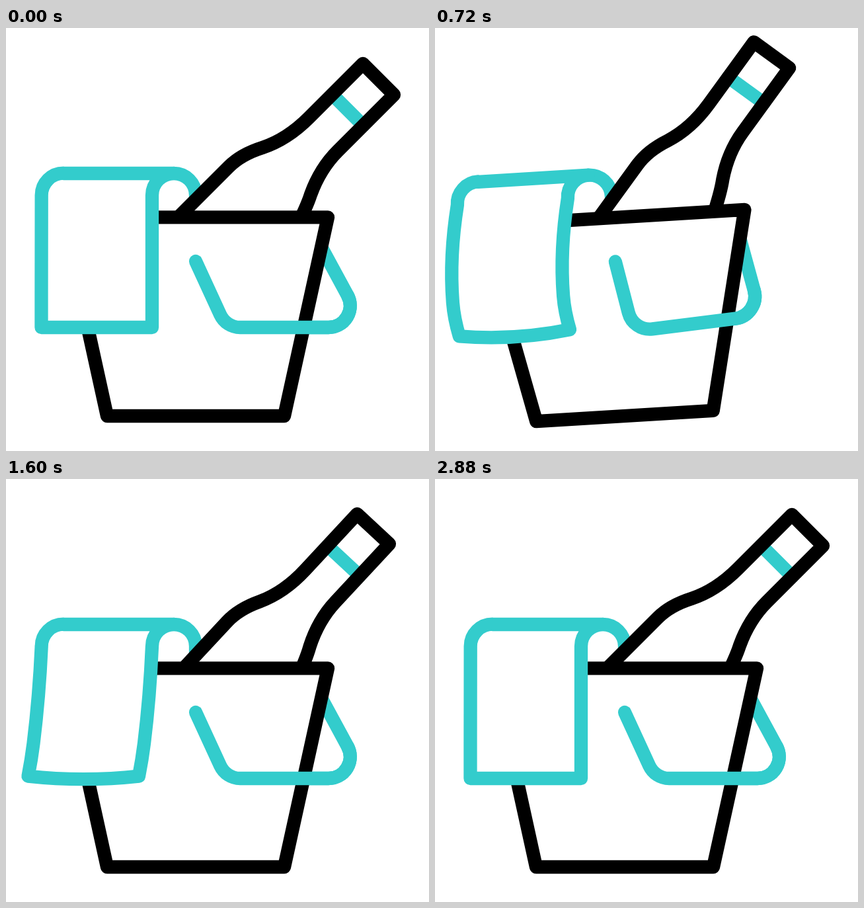
These frames come from a looping animation (640 by 640 pixels, 3120 ms). An HTML page with a canvas:

```html
<!DOCTYPE html>
<html lang="en">
<head>
<meta charset="utf-8">
<title>Ice bucket</title>
<style>
  html, body { margin: 0; width: 100%; height: 100%; overflow: hidden; background: #fff; }
  canvas { display: block; width: 640px; height: 640px; }
</style>
</head>
<body>
<canvas id="stage" width="640" height="640"></canvas>
<script>
const ctx = document.getElementById('stage').getContext('2d');
const TEAL = '#33cccc', BLACK = '#000', WHITE = '#fff';
const STEP = 40, LAST = 72, LOOP = 3120, BEAT = 8;

// A track is a list of [step, value]; swings turn round once per beat.
const swing = (first, ...values) => [[0, 0], ...values.map((v, i) => [first + BEAT * i, v])];
const tilt = swing(7, 4, -6, 2, -3, 0);
const hem = swing(8, -38, -4, -35.5, -13, -20, 0);
const belly = swing(8, -17.5, -14, -25, -17, -12, 0);
const grip = swing(8, 1, -1.1, 0.85, -0.65, 0);
const lean = [[0, 0], [7, 2.8], [17, -6.1], [23, 1.9], [31, -4.2], [38, -2], [46, -2.5], [56, 0]];
const drop = [[0, 0], [8, 16], [25, -8], [34, 15], [47, -3], [58, 2.5], [72, 0]];

// The two bends of the handle: at rest, swung out, swung in
const REST = [333, 453, 543, 453];
const OUT = [374, 422, 577, 415];
const IN = [300, 465, 494, 452.5];

const mix = (a, b, p) => a + (b - a) * p;

function at(track, f, blend = mix) {
  const i = track.findIndex(k => k[0] > f);
  if (i < 0) return blend(track.at(-1)[1], track.at(-1)[1], 0);
  const [a, va] = track[i - 1], [b, vb] = track[i];
  const p = (f - a) / (b - a);
  return blend(va, vb, p * p * (3 - 2 * p));
}

function bends(amount) {
  const to = amount > 0 ? OUT : IN;
  return REST.map((v, i) => mix(v, to[i], Math.abs(amount)));
}

function blendBends(a, b, p) {
  const end = bends(b);
  return bends(a).map((v, i) => mix(v, end[i], p));
}

function turn(x, y, deg) {
  ctx.translate(x, y);
  ctx.rotate(deg * Math.PI / 180);
  ctx.translate(-x, -y);
}

function line(...p) {
  ctx.beginPath();
  for (let i = 0; i < p.length; i += 2) ctx.lineTo(p[i], p[i + 1]);
}

function ink(color, filled) {
  if (filled) {
    ctx.fillStyle = WHITE;
    ctx.fill();
  }
  ctx.strokeStyle = color;
  ctx.stroke();
}

function bottlePath() {
  line(240, 307, 337, 210);
  ctx.bezierCurveTo(352, 195, 369, 187, 388, 181);
  ctx.bezierCurveTo(415, 172, 437, 157, 458, 136);
  ctx.lineTo(540, 54);
  ctx.lineTo(587, 101);
  ctx.lineTo(502, 186);
  ctx.bezierCurveTo(483, 205, 470, 227, 461, 252);
  ctx.quadraticCurveTo(455, 271, 436, 308);
}

function drawBottle(f) {
  ctx.save();
  ctx.translate(0, at(drop, f));
  turn(313, 290, at(lean, f));
  bottlePath();
  ctx.fillStyle = WHITE;
  ctx.fill();
  line(493.5, 100.5, 540.5, 147.5);
  ink(TEAL);
  bottlePath();
  ink(BLACK);
  ctx.restore();
}

// Sharp turns get a smaller radius, so the bend never uses up the arm.
function handlePath(f) {
  const [x1, y1, x2, y2] = at(grip, f, blendBends);
  const endX = 478, endY = 333;
  const corner = Math.atan2(y2 - endY, x2 - endX) - Math.atan2(y2 - y1, x2 - x1);
  const radius = Math.min(34, 55 * Math.tan(corner / 2));
  line(287, 353);
  ctx.arcTo(x1, y1, x2, y2, 33);
  ctx.arcTo(x2, y2, endX, endY, radius);
  return () => ctx.lineTo(endX, endY);
}

function drawTowel(f) {
  const L = 53.5, R = 221, mid = 400;
  const edge = at(hem, f), bow = at(belly, f);
  const end = 453 + 0.17 * edge, sag = -0.38 * bow;
  const slope = (bow / 147 + (edge - bow) / 48) / 2;
  const upper = bow - slope * 70, lower = bow + slope * 24;
  line(254, 220, 87, 220);
  ctx.arc(87, 253, 33.3, -Math.PI / 2, Math.PI, true);
  ctx.quadraticCurveTo(L + upper, 330, L + bow, mid);
  ctx.quadraticCurveTo(L + lower, 424, L + edge, end);
  ctx.quadraticCurveTo((L + R) / 2 + edge, end + 2 * sag, R + edge, end);
  ctx.quadraticCurveTo(R + lower, 424, R + bow, mid);
  ctx.quadraticCurveTo(R + upper, 330, R, 253);
  ctx.arc(254, 253, 33, Math.PI, 1.5 * Math.PI);
  ctx.closePath();
  ink(TEAL, true);
}

function draw(f) {
  ctx.fillStyle = WHITE;
  ctx.fillRect(0, 0, 640, 640);
  ctx.lineWidth = 20.3;
  ctx.lineCap = ctx.lineJoin = 'round';
  ctx.save();
  turn(287, 587, at(tilt, f));

  // The whole handle goes behind; its front part is drawn again later.
  handlePath(f)();
  ink(TEAL);

  // Back fold of the towel
  ctx.beginPath();
  ctx.arc(254, 253, 33, -Math.PI / 2, 0);
  ctx.lineTo(287, 286);
  ink(TEAL);

  drawBottle(f);
  line(87, 286.4, 487, 286.4, 421, 587, 153, 587);
  ctx.closePath();
  ink(BLACK, true);
  handlePath(f);
  ink(TEAL);
  drawTowel(f);
  ctx.restore();
}

const start = performance.now();
function tick() {
  const t = (performance.now() - start) % LOOP;
  draw(Math.min(LAST, Math.floor(t / STEP)));
  requestAnimationFrame(tick);
}
tick();
</script>
</body>
</html>
```
